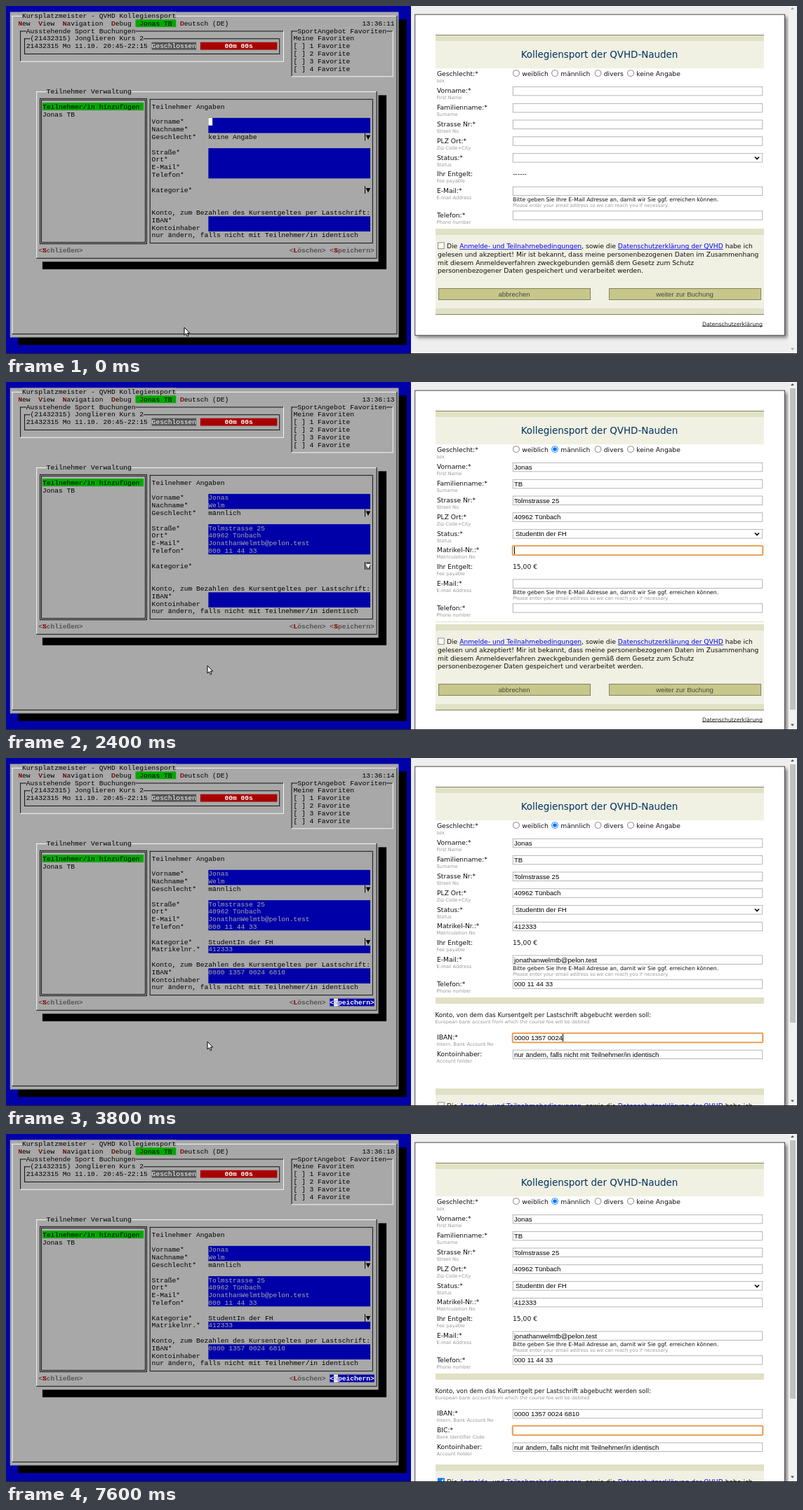
An HTML page with a canvas for the animation above (7790 ms loop, 1127 px wide and 497 px high).

```html
<!DOCTYPE html>
<html lang="de">
<head>
<meta charset="utf-8">
<title>Kursanmeldung</title>
<style>
  html, body { margin: 0; width: 100%; height: 100%; overflow: hidden; }
  canvas { display: block; }
</style>
</head>
<body>
<canvas id="stage" width="1127" height="497"></canvas>
<script>
const ctx = document.getElementById('stage').getContext('2d');
const LOOP = 7790, TICK = 1000 / 15;
const CELL_W = 5.767, CELL_H = 10.81;
const GRAY = '#a8a8a8', BLUE = '#0000a8', GREEN = '#00a800', RED = '#a80000', DIM = '#545454';
const KHAKI = '#e0e1c5', CREAM = '#f0f0e3';
const MONO = '"Liberation Mono", monospace';
const VERD = '"DejaVu Sans", sans-serif';
const ARIAL = '"Liberation Sans", sans-serif';

const user = {
  first: 'Jonas', last: 'Welm', short: 'TB', street: 'Tolmstrasse 25', city: '40962 Tünbach',
  mail: 'JonathanWelmtb@pelon.test', phone: '000 11 44 33', status: 'StudentIn der FH',
  student: '412333', iban: '0000 1357 0024 6810'
};

let tick = 0;
const between = (from, to) => tick >= from && tick < to;
const typed = (text, start, rate) => text.slice(0, Math.max(0, Math.floor((tick - start) * rate + 1e-6)));

function rect(x, y, w, h, color) {
  ctx.fillStyle = color;
  ctx.fillRect(x, y, w, h);
}

function frame(x, y, w, h, color, line = .9) {
  ctx.strokeStyle = color;
  ctx.lineWidth = line;
  ctx.strokeRect(x + line / 2, y + line / 2, w - line, h - line);
}

function poly(points, fill, stroke) {
  ctx.beginPath();
  points.forEach(([x, y]) => ctx.lineTo(x, y));
  ctx.closePath();
  if (fill) { ctx.fillStyle = fill; ctx.fill(); }
  if (stroke) { ctx.strokeStyle = stroke; ctx.lineWidth = 1; ctx.stroke(); }
}

// Writes text centred vertically on y and returns the x where it ends.
function write(text, x, y, size, color = '#111', family = VERD, align = 'left') {
  ctx.font = `${size}px ${family}`;
  ctx.fillStyle = color;
  ctx.textAlign = align;
  ctx.fillText(text, x, y + size * .35);
  return x + ctx.measureText(text).width;
}

// ---------- terminal ----------
const colX = col => col * CELL_W;
const rowTop = row => 19.3 + row * CELL_H;

function cells(col, row, w, color, h = 1) {
  rect(colX(col), rowTop(row), w * CELL_W, h * CELL_H, color);
}

function term(col, row, text, color = '#000', bold = false) {
  ctx.font = `${bold ? 'bold ' : ''}${CELL_W / .6}px ${MONO}`;
  ctx.fillStyle = color;
  ctx.textAlign = 'left';
  ctx.fillText(text, colX(col), Math.round(rowTop(row) + 8.5));
}

function caption(col, row, text) {
  cells(col, row, text.length, GRAY);
  term(col, row, text);
}

function hotkey(col, row, text, at = 0, color = '#000', bold = false) {
  term(col, row, text, color, bold);
  term(col + at, row, text[at], RED, bold);
}

// Lines run through the middle of the border cells, moved outwards by grow.
function bevel(col, row, col2, row2, topLeft, bottomRight, grow = 0) {
  const x = colX(col + .5) - grow, y = rowTop(row + .5) - grow;
  const w = colX(col2 + .5) + grow - x, h = rowTop(row2 + .5) + grow - y;
  rect(x, y, w, .9, topLeft);
  rect(x, y, .9, h, topLeft);
  rect(x, y + h, w + .9, .9, bottomRight);
  rect(x + w, y, .9, h, bottomRight);
}

function termField(row, label, text = '', start = 0, rate = 0, from = start, to = start) {
  const value = typed(text, start, rate), active = between(from, to);
  term(36, row, label);
  term(50, row, value, active ? '#fff' : GRAY, active);
  if (active) cells(50 + value.length, row, 1, '#fff');
}

function termSelect(row, label, value, active) {
  term(36, row, label);
  term(50, row, value);
  const y = rowTop(row);
  rect(511, y, 1, CELL_H, '#000');
  if (active) cells(89, row, 1, DIM);
  poly([[512.7, y + 3], [519.3, y + 3], [516, y + 9.5]], active ? '#fff' : '#000');
}

function drawTerminal() {
  rect(0, 0, 577, 497, BLUE);
  cells(3, 0, 96, '#000', 43);
  cells(1, -1, 96, GRAY, 43);
  bevel(1, -1, 96, 41, '#fff', '#000');
  caption(4, -1, 'Kursplatzmeister - QVHD Kollegiensport');

  hotkey(3, 0, 'New');
  hotkey(8, 0, 'View');
  hotkey(14, 0, 'Navigation');
  hotkey(26, 0, 'Debug');
  cells(32, 0, 10, GREEN);
  hotkey(33, 0, `${user.first} ${user.short}`);
  hotkey(43, 0, 'Deutsch (DE)');
  term(88, 0, '13:36:' + (11 + Math.floor((tick + 1) / 15)));

  bevel(3, 1, 68, 5, '#000', '#fff');
  caption(5, 1, 'Ausstehende Sport Buchungen');
  bevel(4, 2, 67, 4, '#000', '#000');
  caption(6, 2, '(21432315) Jonglieren Kurs 2');
  term(5, 3, '21432315 Mo 11.10. 20:45-22:15');
  cells(36, 3, 11, DIM);
  term(36, 3, 'Geschlossen', '#fff');
  cells(48, 3, 19, RED);
  term(54, 3, '00m 00s', '#fff', true);

  bevel(70, 1, 95, 7, '#000', '#fff');
  caption(72, 1, 'SportAngebot Favoriten');
  term(71, 2, 'Meine Favoriten');
  for (let i = 1; i < 5; i++) term(71, 2 + i, `[ ] ${i} Favorite`);

  cells(9, 10, 85, '#000', 23);
  cells(7, 9, 85, GRAY, 23);
  bevel(7, 9, 91, 31, '#fff', '#000');
  caption(10, 9, 'Teilnehmer Verwaltung');
  bevel(8, 10, 34, 29, '#000', '#000', 1);
  bevel(8, 10, 34, 29, '#000', '#000', -1);
  bevel(35, 10, 90, 29, '#000', '#000');

  cells(9, 11, 25, GREEN);
  term(9, 11, 'Teilnehmer/in hinzufügen');
  term(9, 12, `${user.first} ${user.short}`);
  term(36, 11, 'Teilnehmer Angaben');

  cells(50, 13, 40, BLUE, 2);
  termField(13, 'Vorname*', user.first, 8, 4, 0, 10);
  termField(14, 'Nachname*', user.last, 10, 4, 10, 12);
  termSelect(15, 'Geschlecht*', tick < 14 ? 'keine Angabe' : 'männlich', between(12, 14));

  cells(50, 17, 40, BLUE, 4);
  termField(17, 'Straße*', user.street, 15, 4, 14, 19);
  termField(18, 'Ort*', user.city, 19, 4, 19, 23);
  termField(19, 'E-Mail*', user.mail, 23, 4, 23, 30);
  termField(20, 'Telefon*', user.phone, 30, 4, 30, 33);

  termSelect(22, 'Kategorie*', tick < 38 ? '' : user.status, between(33, 38));
  if (tick >= 38) {
    cells(50, 23, 40, BLUE);
    termField(23, 'Matrikelnr.*', user.student, 38, 2.5, 38, 41);
  }

  term(36, 25, 'Konto, zum Bezahlen des Kursentgeltes per Lastschrift:');
  cells(50, 26, 40, BLUE, 2);
  termField(26, 'IBAN*', user.iban, 41, 3.7, 41, 48);
  termField(27, 'Kontoinhaber', '', 48, 0, 48, 50);
  term(36, 28, 'nur ändern, falls nicht mit Teilnehmer/in identisch');

  hotkey(8, 30, '<Schließen>', 1, DIM, true);
  hotkey(70, 30, '<Löschen>', 1, DIM, true);
  if (tick < 50) {
    hotkey(80, 30, '<Speichern>', 1, DIM, true);
  } else {
    cells(80, 30, 11, BLUE);
    term(80, 30, '<Speichern>', '#fff', true);
    cells(81, 30, 1, '#fff');
    term(81, 30, 'S', GRAY, true);
  }
}

// ---------- web form ----------
function label(y, text, sub) {
  write(text, 614, y, 9.2);
  write(sub, 613.5, y + 9.9, 6.7, '#999');
}

function webField(y, text, sub, value, from = 0, to = 0, caret = true) {
  label(y, text, sub);
  const top = y - 6.1;
  frame(721.8, top, 356.4, 13.4, '#adadad');
  const end = write(value, 724, y + .7, 9.55, '#000', ARIAL);
  if (!between(from, to)) return;
  ctx.strokeStyle = '#f0a04b';
  ctx.lineWidth = 1.8;
  ctx.beginPath();
  ctx.roundRect(721.6, top - .1, 356.8, 13.6, 1.5);
  ctx.stroke();
  if (caret) rect(Math.round(end), Math.round(top + 1.2), 1, 11, '#000');
}

function radio(x, text, checked) {
  const disc = (r, color) => {
    ctx.beginPath();
    ctx.arc(x, 96, r, 0, 7);
    ctx.fillStyle = color;
    ctx.fill();
  };
  disc(4.8, checked ? '#0075ff' : '#767676');
  disc(3.9, '#fff');
  if (checked) disc(2.8, '#0075ff');
  write(text, x + 8.2, 97, 9.2);
}

function link(text, x, y, size, color) {
  const end = write(text, x, y, size, color);
  rect(x, Math.round(y + size * .45), end - x, .8, color);
  return end;
}

function button(x, y, text) {
  rect(x, y, 217, 17, '#c7c78c');
  frame(x, y, 217, 17, '#7d7d58');
  write(text, x + 108, y + 8.7, 9.55, '#4a4a3c', ARIAL, 'center');
}

function drawConsent(top) {
  rect(612, top, 468, 9, KHAKI);
  rect(612, top + 9, 468, 105, CREAM);
  rect(615, top + 19.5, 9.6, 9.6, '#767676');
  rect(615.8, top + 20.3, 8, 8, '#fff');
  if (tick >= 59) {
    rect(615, top + 19.5, 9.6, 9.6, '#0075ff');
    ctx.strokeStyle = '#fff';
    ctx.lineWidth = 1.5;
    ctx.beginPath();
    ctx.moveTo(617, top + 24.5);
    ctx.lineTo(619.2, top + 26.8);
    ctx.lineTo(623, top + 21.5);
    ctx.stroke();
  }
  const y = top + 24.9, size = 9.17;
  let x = write('Die ', 628, y, size);
  x = link('Anmelde- und Teilnahmebedingungen', x, y, size, '#0000ee');
  x = write(', sowie die ', x, y, size);
  x = link('Datenschutzerklärung der QVHD', x, y, size, '#0000ee');
  write(' habe ich', x, y, size);
  [
    'gelesen und akzeptiert! Mir ist bekannt, dass meine personenbezogenen Daten im Zusammenhang',
    'mit diesem Anmeldeverfahren zweckgebunden gemäß dem Gesetz zum Schutz',
    'personenbezogener Daten gespeichert und verarbeitet werden.'
  ].forEach((line, i) => write(line, 615, y + 11.7 * (i + 1), size));
  button(616, top + 85, 'abbrechen');
  button(859, top + 85, 'weiter zur Buchung');
  rect(612, top + 114, 468, 8, KHAKI);
  rect(612, top + 122, 468, 1, '#85855c');
  link('Datenschutzerklärung', 992, top + 136, 7.75, '#222');
}

function drawScrollbar(thumbEnd) {
  rect(1115, 0, 12, 497, '#f1f1f1');
  const color = thumbEnd ? '#505050' : '#a3a3a3';
  poly([[1118, 5], [1123, 5], [1120.5, 2]], color);
  poly([[1118, 488.5], [1123, 488.5], [1120.5, 491.5]], color);
  if (thumbEnd) rect(1117, 9, 8, thumbEnd - 9, '#c1c1c1');
}

function drawForm() {
  const student = tick >= 33, account = tick >= 38, holder = tick >= 43, bic = tick >= 59;
  const shift = student ? 23.8 : 0;
  const consentTop = holder ? 472 : account ? 416 : student ? 346 : 318;

  rect(577, 0, 550, 497, '#eee');
  ctx.save();
  ctx.shadowColor = '#777';
  ctx.shadowBlur = 5;
  ctx.shadowOffsetX = ctx.shadowOffsetY = 3;
  rect(582.3, 11.7, 527.7, consentTop + 141, '#fff');
  ctx.restore();
  frame(582.3, 11.7, 527.7, consentTop + 141, '#333');

  rect(612, 41, 468, 9, KHAKI);
  rect(612, 41, 468, 1, '#85855c');
  rect(612, 50, 468, 39, CREAM);
  write('Kollegiensport der QVHD-Nauden', 845.5, 69.7, 13.45, '#003060', VERD, 'center');

  label(97, 'Geschlecht:*', 'sex');
  radio(727, 'weiblich');
  radio(782, 'männlich', tick >= 5);
  radio(843.5, 'divers');
  radio(890, 'keine Angabe');
  webField(121, 'Vorname:*', 'First Name', typed(user.first, 10, 1), 9, 17);
  webField(145, 'Familienname:*', 'Surname', typed(user.short, 17, 1), 17, 20);
  webField(168.6, 'Strasse Nr:*', 'Street No', typed(user.street, 20, 2), 20, 27);
  webField(192.4, 'PLZ Ort:*', 'Zip Code+City', typed(user.city, 27, 3), 27, 32);

  webField(216.3, 'Status:*', 'Status', '', 32, 33, false);
  if (student) write(user.status, 726, 217.1, 9.55, '#000', ARIAL);
  ctx.strokeStyle = '#000';
  ctx.lineWidth = 1.6;
  ctx.beginPath();
  ctx.moveTo(1067, 215.5);
  ctx.lineTo(1070, 218.5);
  ctx.lineTo(1073, 215.5);
  ctx.stroke();

  if (student) webField(240, 'Matrikel-Nr.:*', 'Matriculation No', typed(user.student, 36, 2), 35, 41);
  label(240 + shift, 'Ihr Entgelt:', 'Fee payable');
  write(student ? '15,00 €' : '------', 722, 240 + shift, 9.2);
  webField(263.8 + shift, 'E-Mail:*', 'E-mail Address', typed(user.mail.toLowerCase(), 41, 9), 41, 45);
  write('Bitte geben Sie Ihre E-Mail Adresse an, damit wir Sie ggf. erreichen können.', 722, 276.5 + shift, 7.75);
  write('Please enter your email address so we can reach you if necessary.', 722, 285 + shift, 6.7, '#999');
  webField(298.5 + shift, 'Telefon:*', 'Phone number', typed(user.phone, 45, 3), 45, 50);

  if (account) {
    rect(612, 342, 468, 9, KHAKI);
    write('Konto, von dem das Kursentgelt per Lastschrift abgebucht werden soll:', 611.5, 367, 8.66);
    write('European bank account from which the course fee will be debited', 611.5, 376.8, 6.7, '#999');
    webField(399, 'IBAN:*', 'Intern. Bank Account No', typed(user.iban, 55, 7), 56, 59);
  } else if (student) {
    rect(612, 342, 468, 1, KHAKI);
  }
  if (bic) webField(422.8, 'BIC:*', 'Bank Identifier Code', '', 59, 200, Math.floor((tick - 58) / 8) % 2 === 0);
  if (holder) {
    webField(bic ? 446.6 : 422.8, 'Kontoinhaber:', 'Account holder',
      'nur ändern, falls nicht mit Teilnehmer/in identisch');
  }
  drawConsent(consentTop);
  drawScrollbar(holder ? 378 : account ? 413 : student ? 468 : 0);
}

// ---------- pointer ----------
const pointerPath = [[0, 254, 459], [2, 275, 433], [4, 287, 405], [89, 270, 428], [90, 245, 448], [91, 221, 465]];
const arrow = [[0, 0], [0, 11], [2.5, 8.7], [4.2, 12.8], [6, 12], [4.3, 8.1], [7.7, 8]];

function drawPointer() {
  if (tick >= 92) return;
  const [, x, y] = pointerPath.findLast(([from]) => tick >= from);
  poly(arrow.map(([dx, dy]) => [x + dx, y + dy]), '#fff', '#000');
}

function draw(now) {
  tick = Math.floor((now % LOOP + 4) / TICK);
  drawForm();
  drawTerminal();
  drawPointer();
  rect(0, 496, 1127, 1, '#222');
  requestAnimationFrame(draw);
}
requestAnimationFrame(draw);
</script>
</body>
</html>
```
